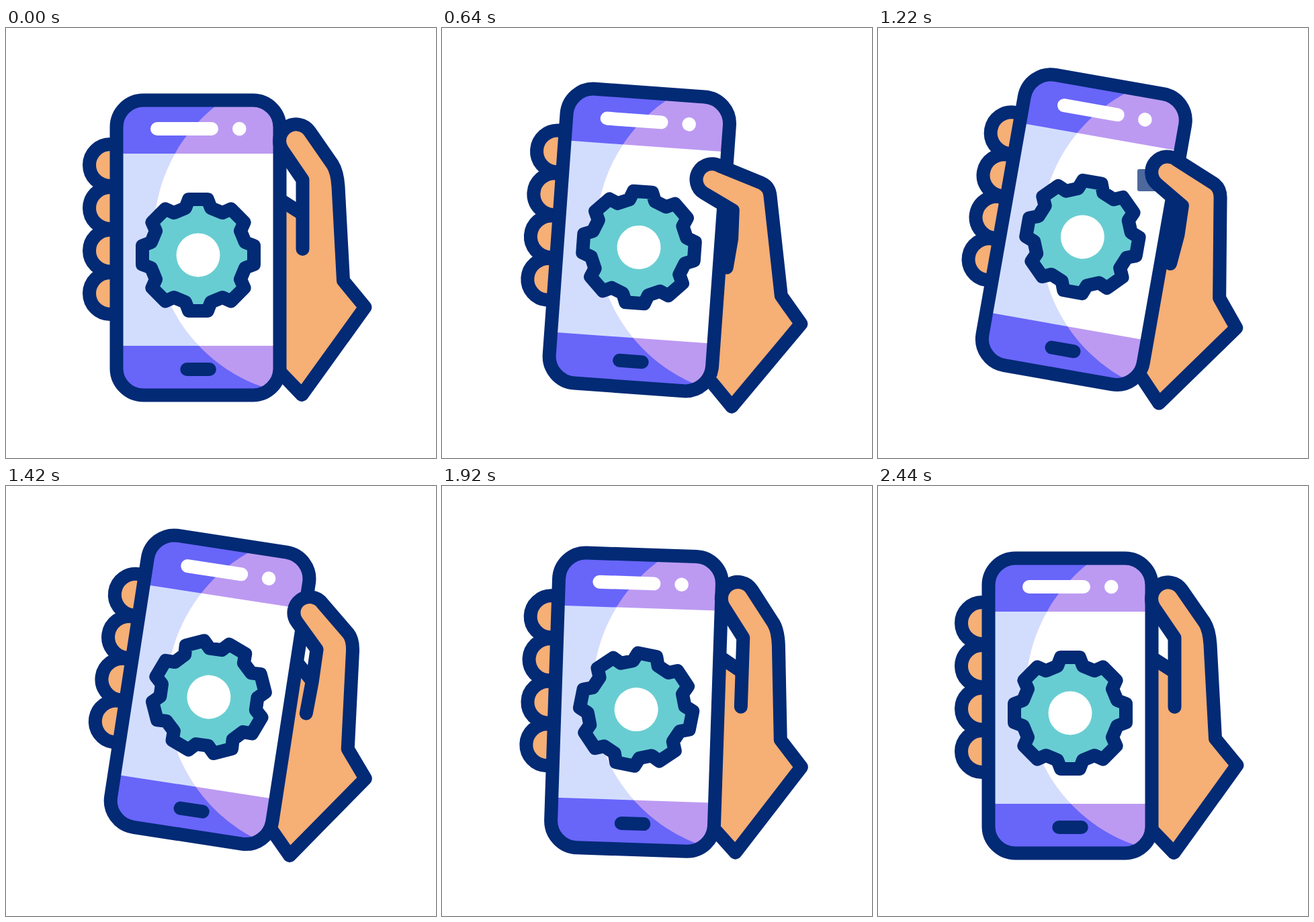
An HTML page for the animation above (2.62 s loop, 640 by 640 pixels).

```html
<!DOCTYPE html>
<html lang="en">
<head>
<meta charset="utf-8">
<title>Phone settings</title>
<style>
  html, body { margin: 0; width: 100%; height: 100%; overflow: hidden; background: #fff; }
  svg { display: block; width: 100vw; height: 100vh; }
  .line { fill: none; stroke: #022a75; stroke-width: 20; stroke-linecap: round; stroke-linejoin: round; }
  .skin { fill: #f6af75; }
  .navy { fill: #022a75; }
</style>
</head>
<body>
<svg viewBox="0 0 640 640">
  <defs>
    <clipPath id="screen"><rect x="165" y="108" width="242" height="438" rx="40"/></clipPath>
    <clipPath id="shine"><circle cx="462" cy="306" r="242"/></clipPath>
  </defs>

  <g class="tilt">
    <g id="fingers"></g>
    <path id="palm" class="skin"/>
    <path id="web" class="line"/>
    <g clip-path="url(#screen)">
      <rect x="160" y="100" width="250" height="450" fill="#6865f9"/>
      <rect x="160" y="187" width="250" height="286" fill="#d2ddfe"/>
      <g clip-path="url(#shine)">
        <rect x="160" y="100" width="250" height="450" fill="#bc9af2"/>
        <rect x="160" y="187" width="250" height="286" fill="#fff"/>
      </g>
    </g>
    <rect class="line" x="164.5" y="107.5" width="243" height="439" rx="40"/>
    <rect x="215" y="140" width="101" height="20" rx="10" fill="#fff"/>
    <circle cx="347.3" cy="150" r="10.3" fill="#fff"/>
    <rect class="navy" x="259.3" y="498" width="53.5" height="20" rx="10"/>
    <g id="gear">
      <polygon id="cog" class="line" style="fill:#68cdd2"/>
      <circle r="32.5" fill="#fff"/>
    </g>
  </g>

  <g id="tap">
    <rect class="navy" x="386" y="210" width="34" height="33" rx="3"/>
    <circle cx="403" cy="226.5" r="1.3" fill="#fff"/>
  </g>

  <g class="tilt">
    <path id="thumb" class="skin"/>
    <path id="outline" class="line"/>
  </g>
</svg>
<script>
const LOOP = 2620;
const $ = id => document.getElementById(id);

// Each pair holds the relaxed and the pressing pose of the same path.
const palm = [
  'M400 251L441.5 277L502 376L534.5 415.5L440.5 546L400 504',
  'M400 272L420 321L502.5 397.5L535 437L441 567.5L400 525'];
const web = ['M407 255L441.5 277', 'M407 290L420 321'];
const thumb = [
  'M441.5 329L441.5 277L441.5 226L411.5 182A20 20 0 0 1 452 154L486 203Q493 214 494.5 236L502 376',
  'M415 363L420 321L418.4 280L371.5 260.8A20 20 0 0 1 390 217L457.6 233.4Q471 237 473 251.5L502.5 397.5'];
const wrist = ['L534.5 415.5L440.5 546L408 512', 'L535 437L441 567.5L408.7 533.5'];
const outline = thumb.map((d, i) => d + wrist[i]);

const mix = ([a, b], p) => {
  const end = b.match(/[\d.]+/g);
  let i = 0;
  return a.replace(/[\d.]+/g, n => +n + (end[i++] - n) * p);
};

const ease = (t, from, to) => {
  const x = Math.min(1, Math.max(0, (t - from) / (to - from)));
  return x * x * (3 - 2 * x);
};

$('fingers').innerHTML = [204, 268, 331.5, 395].map(y =>
  `<circle class="line" style="fill:#f6af75" cx="155" cy="${y}" r="31"/>`).join('');

const teeth = [];
for (let k = 0; k < 8; k++) {
  const c = Math.cos(k * Math.PI / 4), s = Math.sin(k * Math.PI / 4);
  for (const [x, y] of [[-19, -70], [-14, -83], [14, -83], [19, -70]])
    teeth.push([x * c - y * s, x * s + y * c]);
}
$('cog').setAttribute('points', teeth.join(' '));

const tilts = document.querySelectorAll('.tilt');

function draw() {
  const t = performance.now() % LOOP;
  const angle = 10 * (ease(t, 200, 1200) - ease(t, 1200, 2200));
  const press = ease(t, 200, 770) - ease(t, 1000, 1680);
  const spin = 180 * Math.min(1, Math.max(0, (t - 1280) / 1160));

  for (const g of tilts) g.setAttribute('transform', `rotate(${angle} 450 430)`);
  $('gear').setAttribute('transform', `translate(286 338) rotate(${spin})`);
  for (const [id, poses] of Object.entries({ palm, web, thumb, outline }))
    $(id).setAttribute('d', mix(poses, press));
  $('tap').setAttribute('opacity', t >= 1200 && t < 1270 ? 1 - (t - 1200) / 71 : 0);

  requestAnimationFrame(draw);
}
draw();
</script>
</body>
</html>
```
